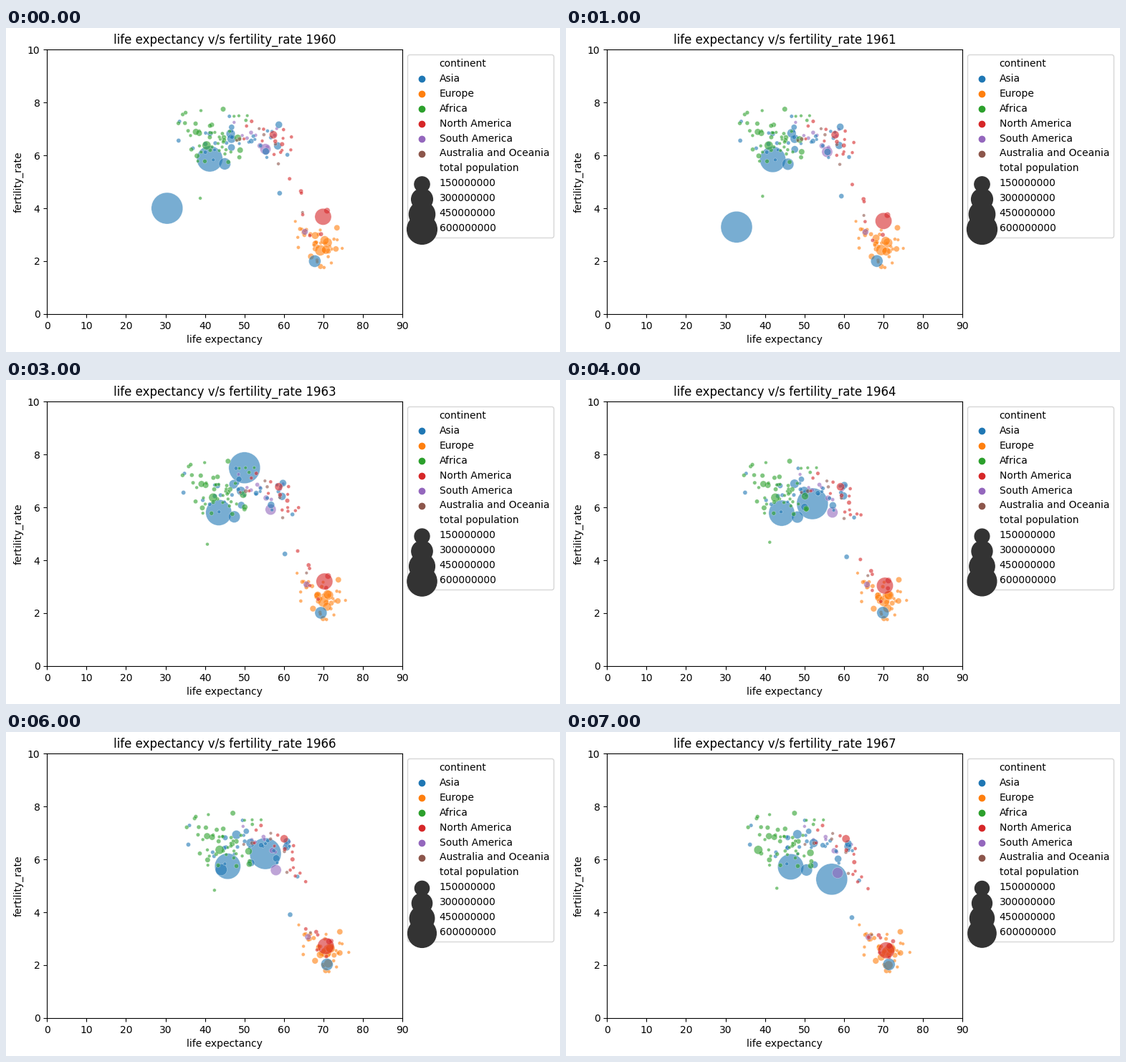
A matplotlib script that plays this animation: 773x453 px, repeating every 8 s.

```python
import numpy as np
import matplotlib.pyplot as plt
from matplotlib.animation import FuncAnimation

W, H, DPI = 773, 453, 100
LEFT, BOTTOM, AX_W, AX_H = 57.22, 53.1, 496, 369.6
YEARS = 8
T = np.arange(YEARS)

COLORS = {
    "Asia": "#1f77b4",
    "Europe": "#ff7f0e",
    "Africa": "#2ca02c",
    "North America": "#d62728",
    "South America": "#9467bd",
    "Australia and Oceania": "#8c564b",
}

rng = np.random.default_rng(12)
bubbles = []  # (colour, population in millions, life per year, fertility per year)


def path(continent, pop, life, fert):
    """Add one bubble; key points are spread evenly over the years."""
    def spread(keys):
        return np.interp(T, np.linspace(0, YEARS - 1, len(keys)), keys)
    bubbles.append((COLORS[continent], pop, spread(life), spread(fert)))


def transition(life, middle):
    """Fertility falls from high to low as life expectancy passes the middle."""
    return 2.5 + 4.25 / (1 + np.exp((life - middle) / 1.7))


def crowd(continent, count, lo, hi, gain, middle=64, noise=0.45, pop=4):
    """Small countries scattered along the transition, living longer each year."""
    for _ in range(count):
        life = lo + (hi - lo) * rng.beta(2, 2) + T * gain * rng.uniform(0.6, 1.4)
        fert = transition(life, middle + 0.15 * T)
        fert += np.clip(rng.normal(0, noise), -2 * noise, 2 * noise)
        path(continent, rng.exponential(pop), life, fert)


# The largest country lies below everything else
path("Asia", 667, (30.4, 32.8, 43.1, 50, 52, 53.7, 55.3, 56.9),
     (4, 3.29, 5.97, 7.5, 6.14, 6.06, 6.22, 5.25))

crowd("Europe", 36, 62, 75, 0.2, middle=61, noise=0.38, pop=6)
path("Europe", 73, (69.2, 70.9), (2.41, 2.49))
path("Europe", 52, (71, 71.8), (2.7, 2.65))
path("Europe", 46, (70.3, 72), (2.79, 2.6))
path("Europe", 43, (70.6, 71.3), (2.43, 2.0))
path("Europe", 29, (67.9, 69.4), (2.97, 2.3))

crowd("South America", 9, 43, 68, 0.4)
path("South America", 73, (55.3, 58.4), (6.24, 5.49))
path("South America", 20, (65.3, 66.2), (3.11, 3.06))

path("Asia", 450, (41.2, 46.5), (5.87, 5.72))
path("Asia", 88, (*np.linspace(45, 48.2, 5), 46.9, 44.1, 50.5), (5.68, 5.6))
path("Asia", 93, (67.8, 71.4), (2, 2.03))
path("Asia", 48, (46.5, 48.2), (6.82, 6.95))
path("Asia", 45, (46.7, 52.3), (6.63, 6.62))
path("Asia", 33, (58.4, 61), (6.36, 6.49))
path("Asia", 28, (46.7, 52.5), (6.3, 5.8))
path("Asia", 27, (58.7, 61.1), (7.16, 6.6))
path("Asia", 27, (55.4, 58.5), (6.15, 6.02))
path("Asia", 10, (58.9, 62), (4.57, 3.8))
crowd("Asia", 26, 31, 67, 0.6, noise=0.5)

crowd("Africa", 44, 31, 52, 0.42, noise=0.5)
path("Africa", 45, (*np.linspace(40.4, 43.7, 7), 38.3), (6.38, 6.36))
path("Africa", 27, (48.3, 51.5), (6.66, 6.25))
path("Africa", 22, (37.7, 41), (6.89, 6.88))
path("Africa", 17, (48.9, 51.6), (6.2, 5.76))
path("Africa", 1, (38.8, 43), (4.38, 4.91))

crowd("Australia and Oceania", 7, 40, 71, 0.4, pop=1)

crowd("North America", 20, 46, 71, 0.5, pop=2)
path("North America", 36, (57.3, 60.5), (6.78, 6.78))
path("North America", 18, (70.9, 71.5), (3.91, 2.73))
path("North America", 180, (69.9, 70.7), (3.68, 2.56))

FACES, POPS, LIFE, FERT = map(np.array, zip(*bubbles))


def size(pop, top):
    return 10 + 990 * pop / top


def top_pop(year):
    """Population of the largest country: a brief dip, then steady growth."""
    return max(667 - 7 * year, 630 + 17.5 * year)


fig = plt.figure(figsize=(W / DPI, H / DPI), dpi=DPI)
ax = fig.add_axes([LEFT / W, BOTTOM / H, AX_W / W, AX_H / H])


def draw_legend(top):
    def key(label, color, s):
        return ax.scatter([], [], s=s, color=color, label=label)

    keys = [key("continent", "none", 0)]
    keys += [key(name, color, 36) for name, color in COLORS.items()]
    keys.append(key("total population", "none", 0))
    keys += [key(f"{n}000000", "0.2", size(n, top)) for n in (150, 300, 450, 600)]
    ax.legend(handles=keys, loc="upper left", bbox_to_anchor=(1, 1))


def draw(year):
    ax.clear()
    # All populations grow together, so bubble sizes hold
    ax.scatter(LIFE[:, year], FERT[:, year], s=size(POPS, POPS.max()), c=FACES,
               alpha=0.6, edgecolors="white", linewidths=0.3)
    ax.set(xlim=(0, 90), ylim=(0, 10), xlabel="life expectancy",
           ylabel="fertility_rate",
           title=f"life expectancy v/s fertility_rate {1960 + year}")
    draw_legend(top_pop(year))


anim = FuncAnimation(fig, draw, frames=YEARS, interval=1000, repeat=True)
plt.show()
```
